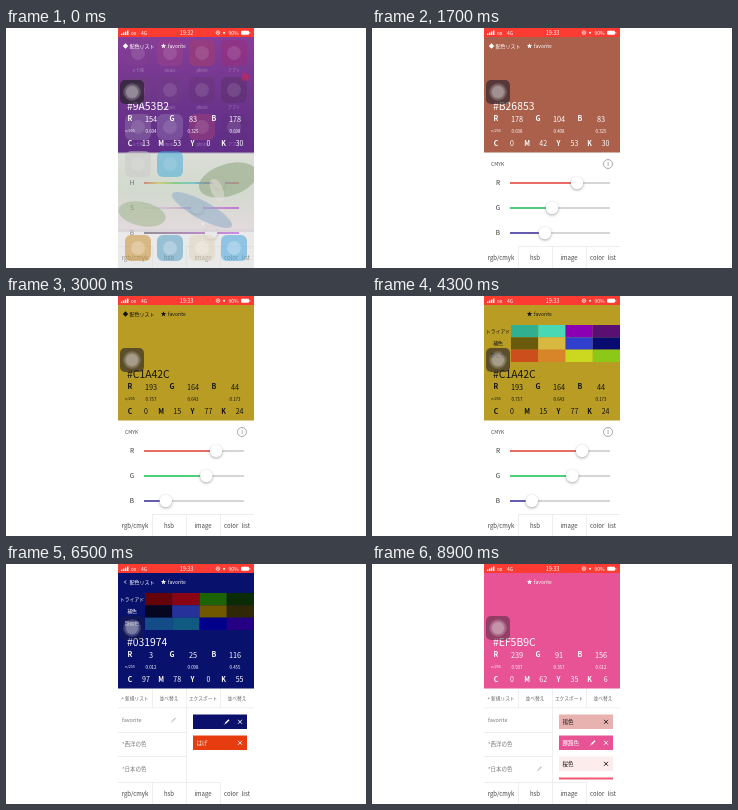
An HTML page with a canvas that plays this animation: 360x240 px, repeating every 9000 ms.

```html
<!DOCTYPE html>
<html lang="ja">
<head>
<meta charset="utf-8">
<style>
html, body { margin: 0; width: 100%; height: 100%; overflow: hidden; background: #fff; }
canvas { display: block; }
</style>
</head>
<body>
<canvas id="stage" width="360" height="240"></canvas>
<script>
const ctx = document.getElementById('stage').getContext('2d');
const LOOP = 9000, LEFT = 112, W = 136;
const FONT = '"Noto Sans CJK JP", "Noto Sans CJK", "Noto Sans", sans-serif';
const LINE = '#e9e9e9';

const goldPalette = ['#30b090', '#48d8b4', '#8c00b4', '#5a1070',
  '#6a5a0c', '#d8b840', '#3040cc', '#080c70',
  '#cc4e1c', '#d88428', '#ccd820', '#8cc818'];
const navyPalette = ['#640408', '#8a0414', '#1c6404', '#0a2c04',
  '#060620', '#26329a', '#705800', '#302804',
  '#144c88', '#105a82', '#00008c', '#260084'];

const favorites = [['', '#0a106c'], ['はげ', '#e63c10']];
const japanese = [['鴇色', '#e8b2b0'], ['躑躅色', '#e75394'], ['桜色', '#fcecec'], ['薔薇色', '#f05b72']];

// Each step overrides part of the state that came before it.
const steps = [
  [0, { home: .5, clock: '19:32', page: 'hsb', rgb: [154, 83, 178], touch: 1, nav: '◆', toast: 0,
        palette: null, list: favorites, picked: -1, row: 0 }],
  [100, { home: .16 }],
  [200, { home: 0, clock: '19:33', touch: .5 }],
  [500, { touch: .7 }],
  [600, { touch: .85 }],
  [1000, { rgb: hsv(310, .534, .698) }],
  [1100, { rgb: hsv(340, .534, .698) }],
  [1200, { rgb: hsv(13, .534, .698) }],
  [1700, { page: 'rgb' }],
  [1800, { rgb: [178, 104, 62] }],
  [1900, { rgb: [178, 104, 44] }],
  [2100, { rgb: [178, 72, 44] }],
  [2400, { rgb: [174, 72, 44] }],
  [2600, { rgb: [193, 72, 44] }],
  [2900, { rgb: [193, 125, 44] }],
  [3000, { rgb: [193, 164, 44] }],
  [4300, { palette: goldPalette, nav: '' }],
  [4400, { nav: '<' }],
  [4700, { rgb: [3, 25, 116] }],
  [5200, { toast: .3 }],
  [5300, { toast: .65 }],
  [5400, { touch: .4 }],
  [5700, { toast: .3 }],
  [5800, { toast: 0 }],
  [5900, { page: 'list' }],
  [6500, { palette: navyPalette, picked: 0 }],
  [7600, { list: japanese, row: 2, picked: -1, touch: .6 }],
  [8000, { rgb: [237, 182, 180], picked: 0 }],
  [8400, { rgb: [254, 238, 237], picked: 2 }],
  [8900, { rgb: [239, 91, 156], picked: 1, palette: null, nav: '' }],
];

function hsv(h, s, v) {
  return [5, 3, 1].map(n => {
    const k = (n + h / 60) % 6;
    return Math.round(255 * v * (1 - s * Math.max(0, Math.min(k, 4 - k, 1))));
  });
}

function toHsv([r, g, b]) {
  const max = Math.max(r, g, b), d = max - Math.min(r, g, b) || 1e-9;
  const h = max === r ? (g - b) / d : max === g ? 2 + (b - r) / d : 4 + (r - g) / d;
  return [(h + 6) % 6 / 6, d / max, max / 255];
}

const ink = rgb => rgb[0] * .3 + rgb[1] * .59 + rgb[2] * .11 > 150 ? '#111' : '#fff';
const hex = rgb => '#' + rgb.map(v => v.toString(16).padStart(2, '0')).join('').toUpperCase();
// The screen shows colours slightly darker than their nominal values.
const screen = rgb => hex(rgb.map(v => Math.max(8, v - 8)));

function rect(x, y, w, h, color, radius = 0) {
  ctx.fillStyle = color;
  ctx.beginPath();
  ctx.roundRect(x, y, w, h, radius);
  ctx.fill();
}

function ellipse(x, y, rx, ry, color, angle = 0) {
  ctx.fillStyle = color;
  ctx.beginPath();
  ctx.ellipse(x, y, rx, ry, angle, 0, 7);
  ctx.fill();
}

const disc = (x, y, r, color) => ellipse(x, y, r, r, color);

function ring(x, y, r, color) {
  ctx.strokeStyle = color;
  ctx.lineWidth = .7;
  ctx.beginPath();
  ctx.arc(x, y, r, 0, 7);
  ctx.stroke();
}

function stroke(color, width, ...points) {
  ctx.strokeStyle = color;
  ctx.lineWidth = width;
  ctx.beginPath();
  points.forEach(([x, y]) => ctx.lineTo(x, y));
  ctx.stroke();
}

function text(s, x, y, size, color, align = 'center', weight = 400) {
  ctx.font = `${weight} ${size}px ${FONT}`;
  ctx.textAlign = align;
  ctx.textBaseline = 'middle';
  ctx.fillStyle = color;
  ctx.fillText(s, x, y);
}

function star(x, y, r, color) {
  ctx.fillStyle = color;
  ctx.beginPath();
  for (let i = 0; i < 10; i++) {
    const a = i * Math.PI / 5, d = i % 2 ? r * .42 : r;
    ctx.lineTo(x + d * Math.sin(a), y - d * Math.cos(a));
  }
  ctx.fill();
}

function pencil(x, y, color) {
  stroke(color, 1.5, [x - 1.5, y + 1.5], [x + 2, y - 2]);
  stroke(color, .8, [x - 2.7, y + 2.7], [x - 1, y + 1]);
}

function cross(x, y, color) {
  stroke(color, .9, [x - 2, y - 2], [x + 2, y + 2]);
  stroke(color, .9, [x - 2, y + 2], [x + 2, y - 2]);
}

function statusBar(s) {
  rect(LEFT, 0, W, 9, '#fc3c32');
  for (let i = 0; i < 4; i++) rect(115 + i * 2, 5.5 - i, 1.4, 1.5 + i, '#fff');
  text('ox', 127.5, 4.7, 5, '#fff');
  text('4G', 138, 4.7, 5, '#fff');
  text(s.clock, 180.5, 4.7, 5.5, '#fff', 'center', 500);
  ring(212, 4.7, 1.8, '#fff');
  disc(212, 4.7, .7, '#fff');
  disc(218, 4.7, 1, '#fff');
  text('90%', 227.5, 4.7, 5, '#fff');
  rect(235, 2.7, 8, 4, '#fff', 1);
  rect(243.4, 4, .8, 1.5, '#fff');
}

function header(s) {
  rect(LEFT, 9, W, 115.5, screen(s.rgb));
  s.palette?.forEach((c, i) => rect(139 + i % 4 * 27.25, 29 + (i >> 2) * 12.33, 27.25, 12.33, c));
}

function headerText(s) {
  const { rgb } = s, color = ink(rgb);
  if (s.nav === '◆') {
    ctx.fillStyle = color;
    ctx.beginPath();
    [[119.5, 15.3], [122.2, 18], [119.5, 20.7], [116.8, 18]].forEach(p => ctx.lineTo(...p));
    ctx.fill();
  }
  if (s.nav === '<') stroke(color, .7, [120.3, 16.5], [118.3, 18], [120.3, 19.5]);
  if (s.nav) text('配色リスト', 123.5, 18, 5, color, 'left');
  star(157.5, 18, 2.8, color);
  text('favorite', 162, 18, 5, color, 'left');
  if (s.palette) {
    ['トライアド', '補色', '類似色'].forEach((label, i) => text(label, 126, 35 + i * 12.3, 4.8, color));
  }
  text(hex(rgb), 121, 78, 10.4, color, 'left', 300);

  const max = Math.max(...rgb);
  text('n/255', 124, 103, 3.6, color);
  rgb.forEach((v, i) => {
    text('RGB'[i], 124 + i * 42, 90.8, 7, color, 'center', 700);
    text(v, 145 + i * 42, 90.8, 7.3, color, 'center', 300);
    text((v / 255).toFixed(3), 145 + i * 42, 103, 4.4, color);
  });
  const cmyk = [...rgb.map(v => (max - v) / max), 1 - max / 255];
  cmyk.forEach((v, i) => {
    text('CMYK'[i], 124 + i * 31.2, 115.8, 6.8, color, 'center', 700);
    text(Math.round(v * 100), 140 + i * 31.2, 115.8, 7, color, 'center', 300);
  });
}

function slider(label, y, value, fill, end, rest) {
  text(label, 126, y, 6.5, '#333');
  const x = 145 + 86 * value;
  if (rest) rect(138, y - .75, end - 138, 1.5, rest);
  rect(138, y - .75, (rest ? x : end) - 138, 1.5, fill);
  ctx.save();
  ctx.shadowColor = 'rgba(0,0,0,.35)';
  ctx.shadowBlur = 3;
  ctx.shadowOffsetY = 1;
  disc(x, y, 6.2, '#fff');
  ctx.restore();
}

function ramp(...colors) {
  const g = ctx.createLinearGradient(138, 0, 233, 0);
  colors.forEach((c, i) => g.addColorStop(i / (colors.length - 1), c));
  return g;
}

function rgbPage(s) {
  text('CMYK', 119, 136, 5, '#444', 'left');
  ring(236, 136, 4.5, '#888');
  text('i', 236, 136, 6, '#777');
  const fills = ['#ee4a3e', '#22cc5c', '#4034a0'];
  s.rgb.forEach((v, i) => slider('RGB'[i], 155 + i * 25, v / 255, fills[i], 238, '#c8c8c8'));
}

function hsbPage(s) {
  const [h, sat, v] = toHsv(s.rgb), pure = `hsl(${h * 360} 100% 48%)`;
  const fills = [
    ramp('#f03030', '#f0e020', '#30d850', '#20d0e0', '#3040e0', '#d030d0', '#f03050'),
    ramp('#f0f0f0', pure),
    ramp('#181020', pure),
  ];
  [h, sat, v].forEach((value, i) => slider('HSB'[i], 155 + i * 25, value, fills[i], 233));
}

function listPage(s) {
  ['+ 新規リスト', '並べ替え', 'エクスポート', '並べ替え'].forEach((label, i) => {
    text(label, 129 + i * 34, 134, 4.7, '#666');
    if (i) rect(112 + i * 34, 125, .7, 18.5, LINE);
  });
  rect(LEFT, 143.5, W, .7, LINE);
  rect(180, 143.5, .7, 75, LINE);
  ['favorite', '*西洋の色', '*日本の色'].forEach((label, i) => {
    const y = 156 + i * 24.3;
    text(label, 116, y, 5.5, '#777', 'left');
    if (i < 2) rect(LEFT, y + 12, 68, .7, LINE);
    if (i === s.row) pencil(167.5, y, '#ccc');
  });

  ctx.save();
  ctx.beginPath();
  ctx.rect(181, 144, 67, 71.5);
  ctx.clip();
  s.list.forEach(([name, fill], i) => {
    const y = 150.5 + i * 21, rgb = [1, 3, 5].map(k => parseInt(fill.slice(k, k + 2), 16));
    const color = ink(rgb);
    rect(187, y, 54, 14.5, fill);
    text(name, 190.5, y + 7.3, 5.5, color, 'left');
    cross(234, y + 7.3, color);
    if (i === s.picked) pencil(221, y + 7.3, color);
  });
  ctx.restore();
}

function tabs(active) {
  rect(LEFT, 218, W, 22, '#fff');
  ctx.wordSpacing = '2px';
  ['rgb/cmyk', 'hsb', 'image', 'color list'].forEach((label, i) => {
    const x = LEFT + i * 34;
    if (i !== active) rect(x, 218, 34, .7, LINE);
    if (i) rect(x, 218, .7, 22, LINE);
    text(label, x + 17, 229.5, 6, '#444', 'center', 500);
  });
  ctx.wordSpacing = '0px';
}

function touchButton(alpha) {
  rect(114, 52, 24, 24, `rgba(40,35,45,${.75 * alpha})`, 5);
  [[9, .14], [7.6, .16], [6, .24]].forEach(([r, a]) => disc(126, 64, r, `rgba(255,255,255,${a})`));
}

function toast(alpha) {
  rect(142, 110, 75.5, 20, `rgba(15,18,45,${alpha})`, 9);
  ctx.wordSpacing = '2px';
  text('save to favorite', 180, 120.7, 5.2, `rgba(190,200,230,${Math.min(1, alpha * 1.4)})`);
  ctx.wordSpacing = '0px';
}

function homeScreen(alpha) {
  ctx.save();
  ctx.globalAlpha = alpha;
  const wall = ctx.createLinearGradient(0, 9, 0, 204);
  [[0, '#7c3088'], [.3, '#4c2070'], [.5, '#341468'], [.59, '#301064'], [.6, '#b8bcb0'], [.78, '#a4b49c'], [1, '#c8b4bc']]
    .forEach(([at, c]) => wall.addColorStop(at, c));
  rect(LEFT, 9, W, 195, wall);
  ellipse(222, 152, 30, 16, '#88a078', -.3);
  ellipse(196, 182, 34, 9, '#88a8c8', .5);
  ellipse(136, 186, 24, 12, '#9cb488', .2);
  ellipse(211, 162, 6, 12, '#e8e0dc', -.4);
  rect(LEFT, 201, W, 39, '#d4d4d6');
  const colors = ['#804090', '#9c4088', '#a83c68', '#9c2c78',
    '#70407c', '#703c84', '#683478', '#583068',
    '#9074a8', '#9070b0', '#a44078', '#603080',
    '#c8c8c8', '#38a8dc'];
  colors.forEach((c, i) => {
    const x = 132 + i % 4 * 32, y = 25 + (i >> 2) * 37;
    rect(x - 13, y - 13, 26, 26, c, 6);
    disc(x, y, 7, 'rgba(255,255,255,.22)');
    if (i < 12) text(['メモ帳', 'music', 'photo', 'アプリ'][i % 4], x, y + 17, 4, '#d8c8e0');
  });
  disc(239, 49, 4, '#e02050');
  for (let i = 0; i < 5; i++) disc(169 + i * 7, 196, 1.2, i === 4 ? '#fff' : '#ddd');
  ['#c88820', '#4898c0', '#e0d4b8', '#38a0dc'].forEach((c, i) => {
    rect(119 + i * 32, 207, 26, 26, c, 6);
    disc(132 + i * 32, 220, 7, 'rgba(255,255,255,.5)');
  });
  ctx.restore();
}

function draw(time) {
  const s = {};
  for (const [at, change] of steps) if (at <= time) Object.assign(s, change);
  rect(0, 0, 360, 240, '#fff');
  ctx.save();
  ctx.beginPath();
  ctx.rect(LEFT, 0, W, 240);
  ctx.clip();
  header(s);
  ({ rgb: rgbPage, hsb: hsbPage, list: listPage })[s.page](s);
  tabs({ rgb: 0, hsb: 1, list: 3 }[s.page]);
  if (s.home) homeScreen(s.home);
  headerText(s);
  if (s.toast) toast(s.toast);
  touchButton(s.touch);
  statusBar(s);
  ctx.restore();
}

const start = performance.now();
function tick() {
  draw((performance.now() - start) % LOOP);
  requestAnimationFrame(tick);
}
tick();
</script>
</body>
</html>
```
